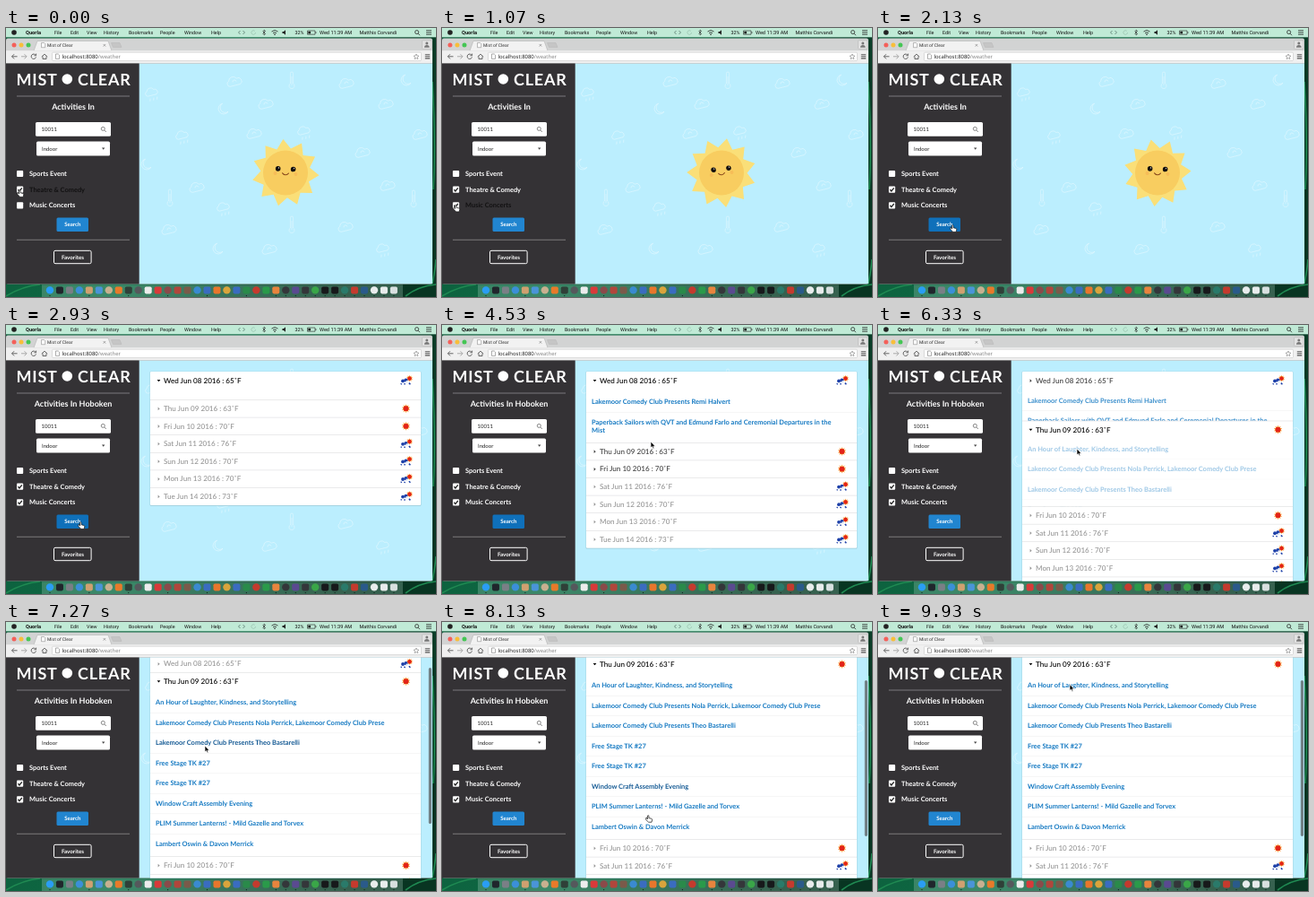
Animation, 480 px wide and 300 px high, one loop 9.99 s. Source, as an HTML page:

```html
<!DOCTYPE html>
<html lang="en">
<head>
<meta charset="utf-8">
<title>Mist of Clear</title>
<style>
html, body { margin: 0; width: 100%; height: 100%; overflow: hidden; background: #0b4a30; }
svg { display: block; }
#stage { width: 100%; height: 100%; }
text { font-family: Lato, sans-serif; text-rendering: geometricPrecision; white-space: pre; }
.ui { font-family: Roboto, sans-serif; }
.url { font-family: "Noto Sans", sans-serif; }
.b { font-weight: 700; }
.m { font-weight: 500; }
.mid { text-anchor: middle; }
</style>
</head>
<body>
<svg id="stage" viewBox="0 0 480 300"></svg>
<script>
const LOOP = 9990;
const stage = document.getElementById('stage');

function el(tag, attrs, parent = stage) {
  const node = document.createElementNS('http://www.w3.org/2000/svg', tag);
  set(node, attrs);
  parent.appendChild(node);
  return node;
}
function set(node, attrs) {
  for (const key in attrs) node.setAttribute(key, attrs[key]);
}
const rect = (x, y, width, height, fill, parent, rx = 0) =>
  el('rect', { x, y, width, height, fill, rx }, parent);
const disc = (cx, cy, r, fill, parent) => el('circle', { cx, cy, r, fill }, parent);
const path = (d, attrs, parent) => el('path', { d, fill: 'none', ...attrs }, parent);
const group = (parent, attrs = {}) => el('g', attrs, parent);
const show = (node, on) => set(node, { visibility: on ? 'visible' : 'hidden' });

// Text is placed by the middle of its line.
function label(str, x, cy, size, fill, cls = '', parent = stage) {
  const node = el('text', { x, y: cy + size * 0.35, 'font-size': size, fill, class: cls }, parent);
  node.textContent = str;
  return node;
}

/* desktop and menu bar */
const defs = el('defs', {});
const grad = el('linearGradient', { id: 'wall', x2: 1, y2: 0.3 }, defs);
[['0', '#0b5a38'], ['0.5', '#0f6a45'], ['1', '#083522']].forEach(([offset, color]) =>
  el('stop', { offset, 'stop-color': color }, grad));
rect(0, 0, 480, 300, 'url(#wall)');
path('M476 60Q480 130 477 180M476 285Q479 270 480 258M0 299Q18 288 38 286M446 299Q460 288 480 286',
  { stroke: '#1f8a52', 'stroke-width': 1.6 });

rect(0, 0, 480, 10.3, '#c0ead6');
disc(9, 5, 2.8, '#222');
label('Quorla', 22, 5, 5.7, '#111', 'ui b');
[['File', 54], ['Edit', 72], ['View', 90], ['History', 109], ['Bookmarks', 137],
  ['People', 172], ['Window', 199], ['Help', 229]]
  .forEach(([name, x]) => label(name, x, 5, 5.4, '#111', 'ui'));
const ink = { stroke: '#222', 'stroke-width': 0.8 };
path('M261.5 3l-2 2l2 2M264.5 3l2 2l-2 2', { ...ink, stroke: '#56756a' });
path('M278.5 5a2.3 2.3 0 1 1-.7-1.6', { ...ink, stroke: '#9cc4b2' });
path('M286.6 3.4l3 3.2L288 8V2l1.6 1.4l-3 3.2', { ...ink, 'stroke-width': 0.6 });
path('M296.5 4Q300 1 303.5 4M298 5.8Q300 4 302 5.8', ink);
disc(300, 7.3, 0.8, '#222');
path('M308.5 4h1.5l2-1.8v5.6l-2-1.8h-1.5z', { fill: '#222' });
label('32%', 322.5, 5, 5.4, '#111', 'ui');
path('M336.5 3h8.5v4.2h-8.5z', { ...ink, 'stroke-width': 0.6 });
rect(337.3, 3.8, 2.8, 2.6, '#222');
rect(345.5, 4.3, 0.8, 1.6, '#222');
label('Wed 11:39 AM', 350, 5, 5.6, '#111', 'ui');
label('Matthis Corvandi', 394.5, 5, 5.5, '#111', 'ui');
path('M460.6 4.6a2 2 0 1 1-4 0a2 2 0 1 1 4 0M460 6.2l2 2', ink);
path('M469 2.8h6M469 5h6M469 7.2h6', ink);

/* browser window */
rect(0, 11.5, 476, 274, '#d2d3d3', stage, 2);
['#f4605a', '#f8be3a', '#44c654'].forEach((c, i) => disc(9 + i * 8, 19, 2.5, c));
path('M31 25.5L35 14.5H114L118 25.5Z', { fill: '#f2f2f2', stroke: '#aaa', 'stroke-width': 0.5 });
path('M39.5 16.5h3l1.2 1.2v4h-4.2z', { fill: '#fff', stroke: '#777', 'stroke-width': 0.5 });
label('Mist of Clear', 46, 19.5, 5, '#333', 'ui');
path('M108.6 18l2.6 2.6M111.2 18l-2.6 2.6', { stroke: '#777', 'stroke-width': 0.6 });
path('M117.5 16.6h9.5l2 4.8h-9.5z', { fill: '#c6c6c6', stroke: '#b4b4b4', 'stroke-width': 0.5 });
set(rect(464.5, 13.8, 10.5, 9.6, '#e2e2e2', stage, 1), { stroke: '#b0b0b0', 'stroke-width': 0.5 });
disc(469.8, 17, 1.5, '#777');
path('M467 21.8q0-2.8 2.8-2.8t2.8 2.8z', { fill: '#777' });

rect(0, 25.2, 476, 14.3, '#f0f0f0');
const grey = { stroke: '#666', 'stroke-width': 1 };
path('M12.6 31.8H6.6M9.1 29.2L6.5 31.8L9.1 34.4', grey);
path('M17 31.8h6M20.5 29.2l2.6 2.6L20.5 34.4', { ...grey, stroke: '#aaa' });
path('M33.2 30.4a2.7 2.7 0 1 0 .3 2M33.6 28.6v2.2h-2.2', grey);
path('M39.8 32l3.2-2.8l3.2 2.8M41 31.6v2.9h4v-2.9', grey);
set(rect(51.5, 27.2, 412, 9.4, '#fff', stage, 1.2), { stroke: '#bbb', 'stroke-width': 0.5 });
path('M55.5 29h2.8l1.2 1.2v4.2h-4z', { stroke: '#777', 'stroke-width': 0.6 });
const url = label('localhost:8080', 62.5, 31.6, 5.95, '#222', 'url');
el('tspan', { fill: '#888' }, url).textContent = '/weather';
path('M458 29l.9 1.9 2 .3-1.5 1.4.4 2-1.8-1-1.8 1 .4-2-1.5-1.4 2-.3z', { stroke: '#777', 'stroke-width': 0.6 });
path('M467.8 29.7h5.4M467.8 31.8h5.4M467.8 33.9h5.4', { stroke: '#555', 'stroke-width': 1.1 });
rect(0, 39, 476, 0.6, '#b5b5b5');

/* page area */
const page = el('svg', { x: 148, y: 39.5, width: 328, height: 246, viewBox: '148 39.5 328 246' });
rect(148, 39.5, 328, 246, '#bbeefe', page);

const shapes = {
  cloud: 'M-6 4a3.2 3.2 0 0 1 0-6.2a4.8 4.8 0 0 1 9-1a3.7 3.7 0 0 1 2.6 7.2ZM-2 0a2 2 0 0 1 4 0',
  temp: 'M-1.6 4V-7.4a1.6 1.6 0 0 1 3.2 0V4a3 3 0 1 1-3.2 0ZM0-4V6',
  moon: 'M4 4.5A6 6 0 1 1 0-6A4.6 4.6 0 0 0 4 4.5Z',
  rain: 'M-5 1a2.8 2.8 0 0 1 0-5.4a4.3 4.3 0 0 1 8-.6a3.2 3.2 0 0 1 2 6ZM-3 4l-1 3M1 4l-1 3M5 4l-1 3'
};
const doodles = [
  ['cloud', 255, 60], ['temp', 319, 58], ['cloud', 380, 62], ['moon', 447, 58], ['rain', 163, 74],
  ['cloud', 290, 85], ['cloud', 424, 85], ['rain', 197, 122], ['cloud', 277, 118], ['moon', 243, 90],
  ['rain', 333, 117], ['cloud', 398, 139], ['temp', 455, 190], ['cloud', 213, 178], ['temp', 183, 189],
  ['cloud', 426, 176], ['moon', 157, 152], ['rain', 243, 202], ['temp', 319, 219], ['cloud', 182, 225],
  ['cloud', 379, 222], ['cloud', 294, 247], ['moon', 237, 246], ['rain', 421, 248], ['cloud', 462, 119]
];
for (const [kind, x, y] of doodles)
  path(shapes[kind], { transform: `translate(${x} ${y}) rotate(${kind === 'temp' ? 0 : -14})`,
    stroke: '#fff', 'stroke-width': 0.8, opacity: 0.42 }, page);

/* sun */
const sun = group(page, { transform: 'translate(312 161.5)' });
const spikes = (n, outer, inner) => Array.from({ length: 2 * n }, (_, i) => {
  const r = i % 2 ? inner : outer, a = i * Math.PI / n;
  return (r * Math.sin(a)).toFixed(2) + ',' + (-r * Math.cos(a)).toFixed(2);
}).join(' ');
const rays = el('polygon', { points: spikes(11, 38, 28), fill: '#fadf78' }, sun);
disc(0, 0, 25, '#f8cd60', sun);
const face = group(sun);
for (const side of [-1, 1]) {
  disc(side * 8.5, -4.3, 2.8, '#15110e', face);
  disc(side * 8.5 + 0.8, -5.3, 0.6, '#fff', face);
  disc(side * 11.5, 1, 2, '#f7bd58', face);
}
path('M-3.4 .4Q0 4.2 3.4 .4', { stroke: '#8a4a1c', 'stroke-width': 1.1, 'stroke-linecap': 'round' }, face);

/* forecast list */
const RIGHT = 463, LEFT = 161, HEAD = 19.6, PITCH = 22.5;
const club = 'Lakemoor Comedy Club';
const days = [
  ['Wed Jun 08 2016 : 65˚F', 1, [`${club} Presents Remi Halvert`,
    'Paperback Sailors with QVT and Edmund Farlo and Ceremonial Departures in the\nMist']],
  ['Thu Jun 09 2016 : 63˚F', 0, ['An Hour of Laughter, Kindness, and Storytelling',
    `${club} Presents Nola Perrick, ${club} Prese`, `${club} Presents Theo Bastarelli`,
    'Free Stage TK #27', 'Free Stage TK #27', 'Window Craft Assembly Evening',
    'PLIM Summer Lanterns! - Mild Gazelle and Torvex', 'Lambert Oswin & Davon Merrick']],
  ['Fri Jun 10 2016 : 70˚F', 0, []],
  ['Sat Jun 11 2016 : 76˚F', 1, []],
  ['Sun Jun 12 2016 : 70˚F', 1, []],
  ['Mon Jun 13 2016 : 70˚F', 1, []],
  ['Tue Jun 14 2016 : 73˚F', 1, []]
];

function burst(x, y, r, parent) {
  const g = group(parent, { transform: `translate(${x} ${y})` });
  el('polygon', { points: spikes(10, r, r * 0.55), fill: '#f8921e' }, g);
  disc(0, 0, r * 0.58, '#e2231a', g);
}
function weather(rainy, parent) {
  if (!rainy) return burst(446.5, 0, 5, parent);
  burst(450.5, -2.4, 3.8, parent);
  [[443, 0.4, 1.9], [446.4, -0.4, 2.1]].forEach(([x, y, r]) => disc(x, y, r, '#1c3fa8', parent));
  disc(447.6, 1.2, 1.3, '#e8f0fa', parent);
  path('M441.6 3.2l-.8 1M445.4 3.2l-.8 1.2M449.8 2.6l1.6 1.6',
    { stroke: '#1c3fa8', 'stroke-width': 1.5 }, parent);
}

const list = group(page);
const shadow = rect(LEFT - 0.4, 52, RIGHT - LEFT + 0.8, 10, '#9fcbd9', list, 1.2);
const card = rect(LEFT, 52, RIGHT - LEFT, 10, '#fff', list, 1);
const rows = days.map(([title, rainy, events], i) => {
  const row = { g: group(list), links: [] };
  if (i) rect(LEFT, -10, RIGHT - LEFT, 0.6, '#dcddde', row.g);
  row.caret = path('', { fill: '#000' }, row.g);
  row.title = label(title, 176, 0, 8.1, '#000', 'm', row.g);
  weather(rainy, row.g);
  row.body = el('svg', { x: LEFT, y: HEAD / 2, width: RIGHT - LEFT, height: 0, overflow: 'hidden' }, row.g);
  row.inner = group(row.body);
  events.forEach((str, k) => {
    const y = 13.9 + PITCH * k;
    if (k) rect(0, y - PITCH / 2, RIGHT - LEFT, 0.5, '#ececec', row.inner);
    const g = group(row.inner);
    str.split('\n').forEach((line, n) =>
      label(line, 6, y + n * 9.6, 7.47, 'inherit', 'b', g).removeAttribute('fill'));
    row.links.push({ g, y });
  });
  return row;
});
const thumb = rect(471.8, 65, 3.2, 174, '#6a7578', page, 1.6);

/* sidebar */
rect(0, 39.5, 148.7, 246, '#343235');
const brand = { 'letter-spacing': 0.8 };
set(label('MIST', 11.5, 57.3, 18, '#fff', 'b'), brand);
set(label('CLEAR', 80, 57.3, 18, '#fff', 'b'), brand);
disc(68.3, 57, 5.8, '#fff');
rect(12, 75.6, 126, 0.8, '#8d8b8e');
rect(12, 235.8, 126, 0.8, '#8d8b8e');
const heading = label('', 75, 87.5, 9, '#fff', 'b mid');
rect(33, 105, 84, 15.8, '#fff', stage, 1.6);
label('10011', 39.5, 113, 6, '#222');
path('M110.3 112.4a2 2 0 1 1-4 0a2 2 0 1 1 4 0M109.8 114l2 2', { stroke: '#666', 'stroke-width': 0.8 });
rect(34, 126.6, 82, 16, '#fff', stage, 1.6);
label('Indoor', 40, 134.6, 6, '#222');
path('M107 133.6h3.4l-1.7 2.1z', { fill: '#444' });
const boxes = [['Sports Event', 162.5], ['Theatre & Comedy', 180.2], ['Music Concerts', 197.8]].map(([name, y]) => {
  rect(12, y - 3.6, 7.2, 7.2, '#fff', stage, 1);
  return {
    y,
    tick: path(`M13.4 ${y}l1.6 1.8l2.8-3.6`, { stroke: '#222', 'stroke-width': 1.3 }),
    text: label(name, 26, y - 0.2, 7.43, '#fff', 'b')
  };
});
const button = rect(56.5, 211.5, 35.5, 15.4, '#2185d0', stage, 1.5);
label('Search', 74.3, 219.2, 6.1, '#fff', 'b mid');
set(rect(53.5, 248.3, 41.6, 14.4, 'none', stage, 1.5), { stroke: '#fff', 'stroke-width': 1 });
label('Favorites', 74.5, 255.5, 6.2, '#fff', 'b mid');

/* dock */
rect(40, 286.3, 403, 13.7, 'rgba(190,225,210,.25)');
const tones = ('2a9df4 20262c 7a7f86 3b8fd8 d0a070 4a94d8 c8b090 e87a2a 2f4038 55585c ececec d83a3a ' +
  '8a4a4a b0463c 7a5a4a 3a8ad0 3a6cc0 e8762c d9a43c 3a6cc0 2a8a4a c43a2e 2a9a4a e8843e ' +
  '34363a 5a4a90 34363a 3aa648 17191b 17191b 2a7a6a c43a2e 2a5a8a e8ecec e8ecec d8e0e0').split(' ');
tones.forEach((c, i) => {
  const x = 49 + i * 10.97;
  if (i % 3) rect(x - 4, 288.4, 8, 8, '#' + c, stage, 1.8);
  else disc(x, 292.4, 4.2, '#' + c);
  if (i % 4 === 0 || i > 22) disc(x, 298.6, 0.6, '#0b1a15');
});

/* pointer */
const pointer = group(stage);
const outline = { 'stroke-width': 0.7, 'stroke-linejoin': 'round' };
const arrow = path('M0 0V7L1.6 5.6L2.7 8L3.9 7.5L2.9 5.2H5Z', { fill: '#000', stroke: '#fff', ...outline }, pointer);
const hand = path('M-.4 .2Q.5-.6 1.1.3V2.8L4.1 3.5Q4.9 3.8 4.8 4.8L4.2 7.4H.8L-2.2 4.6Q-2-.0-.4 4Z',
  { fill: '#fff', stroke: '#111', ...outline }, pointer);

/* motion */
const track = [
  [0, 15, 181], [450, 15, 181], [850, 15, 197.5], [1150, 15, 197.5], [1900, 83, 220], [3050, 83, 220],
  [4000, 222, 180], [4300, 232, 164], [4500, 233, 130], [4650, 233, 130], [5070, 222, 138], [7300, 222, 138],
  [7850, 227, 150], [8180, 230, 220], [9300, 230, 220], [9930, 214, 69.5], [LOOP, 214, 69.5]
];
const hands = [[0, 1250], [1800, 3150], [4900, 6260], [7900, 9350]];
const SEARCHED = 2600, LOADED = 3400, OPENED = 6250;
const clamp = v => Math.max(0, Math.min(1, v));
const smooth = v => (v = clamp(v), v * v * (3 - 2 * v));

function pointerAt(t) {
  t = Math.max(0, t);
  let i = 1;
  while (i < track.length - 1 && track[i][0] < t) i++;
  const [t0, x0, y0] = track[i - 1], [t1, x1, y1] = track[i];
  const k = smooth((t - t0) / (t1 - t0));
  return [x0 + (x1 - x0) * k, y0 + (y1 - y0) * k];
}
// A hover colour lingers briefly after the pointer has left.
function hovered(t, x0, x1, y0, y1, linger = 220) {
  for (let lag = 0; lag <= linger; lag += 55) {
    const [x, y] = pointerAt(t - lag);
    if (x >= x0 && x <= x1 && y >= y0 && y <= y1) return true;
  }
  return false;
}

function drawSun(t) {
  const sway = (1 - Math.cos(t / 1070 * Math.PI)) / 2;
  set(rays, { transform: `rotate(${-4 + t * 0.012}) scale(${0.99 + 0.03 * sway})` });
  set(face, { transform: `rotate(${2 - 9 * sway})` });
}

function drawList(t) {
  const q = 1 - clamp((t - OPENED) / 350), p = t < OPENED ? 0 : 1 - q * q;
  const scroll = 34.6 * smooth((t - 6900) / 800);
  const heights = [t < LOADED ? 11.6 : 59.4 * (1 - p), 185.6 * p];
  const fades = [t < LOADED ? 0 : 1 - p * p, p];
  const pads = [1 - p, p];
  const open = t < OPENED ? 0 : 1;
  let y = 62 - scroll;
  rows.forEach((row, i) => {
    const h = heights[i] || 0;
    set(row.g, { transform: `translate(0 ${y})` });
    let alpha = i === open ? 1 : 0.42;
    if (i === 0 && open) alpha = 1 - 0.58 * p;
    else if (i !== open && hovered(t, LEFT, RIGHT, y - 10, y + 10)) alpha = 0.75;
    set(row.title, { 'fill-opacity': alpha });
    set(row.caret, { 'fill-opacity': alpha, d: i === open ? 'M168.6-.9h3.8l-1.9 2.2z' : 'M169.6-1.7l2 1.9l-2 1.9z' });
    set(row.body, { height: Math.max(0, h), opacity: fades[i] || 0 });
    // The top padding collapses together with the height.
    set(row.inner, { transform: `translate(0 ${-4 * (1 - (pads[i] || 0))})` });
    for (const link of row.links) {
      const cy = y + HEAD / 2 + link.y;
      const hot = i === open && p === 1 && hovered(t - 110, LEFT, 330, cy - 5, cy + 5, 0);
      set(link.g, { fill: hot ? '#155a94' : '#1479c2' });
    }
    y += HEAD + h;
  });
  const top = 52 - scroll, height = y - HEAD / 2 - top;
  set(card, { y: top, height });
  set(shadow, { y: top - 0.2, height: height + 1 });
  set(thumb, { y: 40 + scroll * 0.72, opacity: 0.9 * clamp((t - 6900) / 150) });
}

function draw(t) {
  const found = t >= SEARCHED;
  show(sun, !found);
  show(list, found);
  show(thumb, found);
  if (found) drawList(t); else drawSun(t);
  heading.textContent = found ? 'Activities In Hoboken' : 'Activities In';
  boxes.forEach((box, i) => {
    show(box.tick, i === 1 || (i === 2 && t >= 950));
    set(box.text, { fill: hovered(t, 10, 90, box.y - 7, box.y + 7, 55) ? '#121112' : '#fff' });
  });
  // The button keeps its focus colour until the next click.
  const focused = found && t < OPENED;
  set(button, { fill: focused || hovered(t, 56, 92, 211, 227, 110) ? '#0f70ba' : '#2185d0' });
  const [x, y] = pointerAt(t);
  const pressable = hands.some(([a, b]) => t >= a && t < b);
  set(pointer, { transform: `translate(${x} ${y})` });
  show(hand, pressable);
  show(arrow, !pressable);
}

const start = performance.now();
function tick() {
  draw((performance.now() - start) % LOOP);
  requestAnimationFrame(tick);
}
tick();
</script>
</body>
</html>
```
